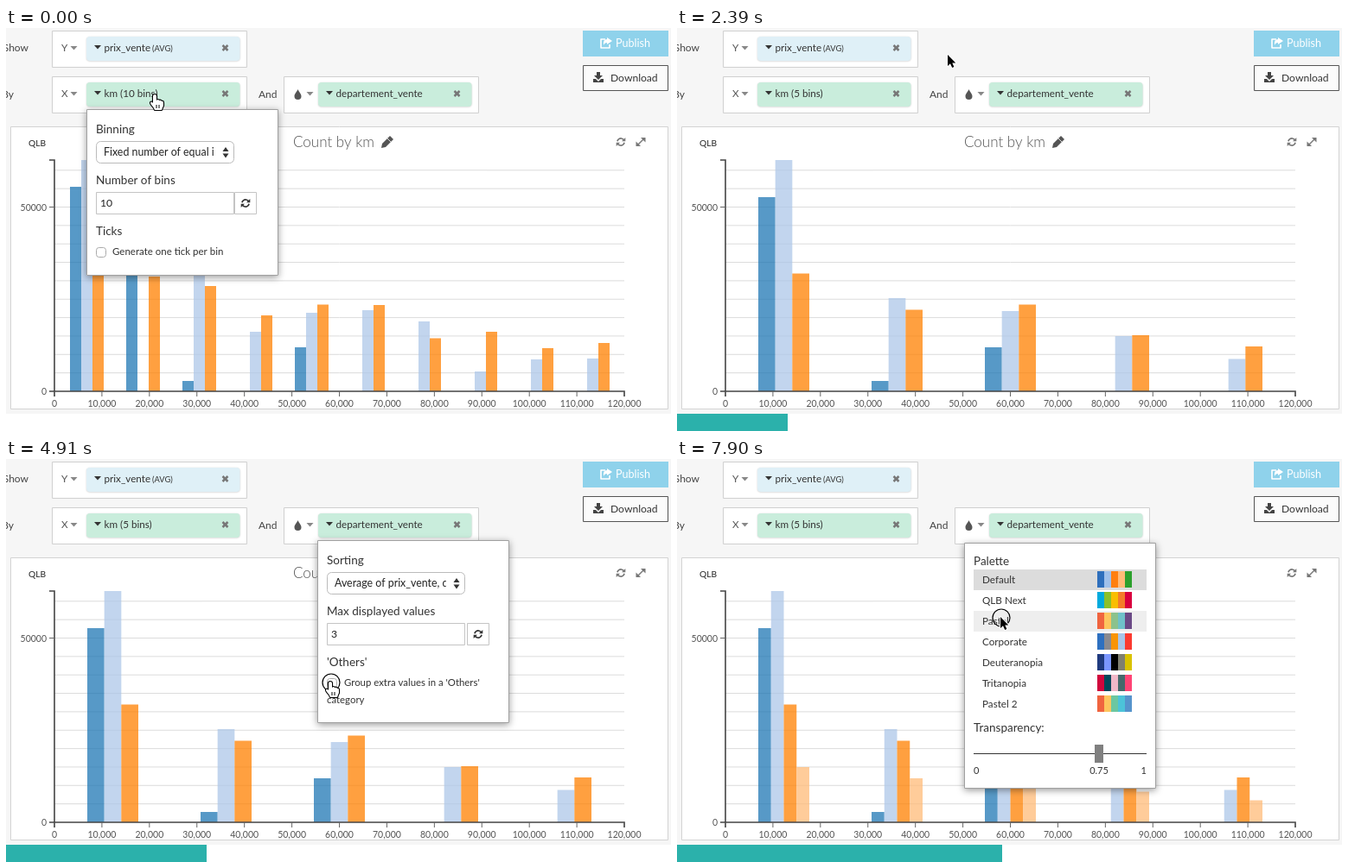
These frames come from a looping animation (769 by 467 pixels, 8 s). An HTML page with a canvas:

```html
<!DOCTYPE html>
<html lang="en">
<head>
<meta charset="utf-8">
<title>Chart options</title>
<style>
html, body { margin: 0; width: 100%; height: 100%; overflow: hidden; background: #fff; }
canvas { display: block; }
</style>
</head>
<body>
<canvas id="stage" width="769" height="467"></canvas>
<script>
const c = document.getElementById('stage').getContext('2d');
const LOOP = 8000;

// Screen updates come in bursts: first time, last time, count.
const bursts = [[150, 1050, 7], [1200, 2240, 8], [2390, 2540, 2], [3130, 3870, 6], [4170, 5210, 8],
  [5360, 6400, 8], [6550, 6700, 2], [7000, 7600, 5], [7900, 7900, 1]];
const ticks = bursts.flatMap(([a, b, n]) =>
  Array.from({ length: n }, (_, i) => a + (b - a) * i / Math.max(1, n - 1)));

// Pointer path: step, x, y, shape until the next key.
const path = [[0, 172, 77, 'hand'], [2, 162, 140, 'arrow'], [4, 140, 200, 'beam'], [6, 107, 202, 'beam'],
  [8, 108, 202, 'beam'], [10, 165, 162, 'hand'], [11, 176, 153, 'hand'], [12, 208, 112, 'arrow'],
  [15, 313, 25, 'arrow'], [17, 313, 37, 'arrow'], [20, 420, 75, 'hand'], [23, 424, 75, 'hand'],
  [24, 420, 100, 'arrow'], [28, 375, 258, 'hand'], [31, 375, 258, 'hand'], [32, 370, 235, 'arrow'],
  [36, 322, 92, 'arrow'], [38, 340, 79, 'hand'], [42, 346, 98, 'arrow'], [46, 374, 183, 'arrow'], [48, 374, 183, 'arrow']];
const clicks = [5, 21, 29, 39, 47];

// Bar tops in pixels per series; 421 is an empty bar.
const tenBins = [
  [184, 284, 409, 421, 370, 421, 421, 421, 421, 421],
  [153, 421, 270, 352, 330, 327, 340, 398, 384, 383],
  [272, 288, 299, 333, 320.5, 321, 359.5, 352, 371, 365]];
const fiveBins = [
  [196, 409, 370, 421, 421],
  [153, 313, 328, 357, 383.5],
  [284.5, 326.5, 320.5, 356, 369],
  [357, 370, 376.5, 385.5, 395.5]];
const seriesColors = ['#1f77b4', '#aec7e8', '#ff8000', '#ffbb78'];

const palettes = [
  ['Default', '#2e6fbc #9fc0ea #ff7f0e #ffbb78 #2ca02c'],
  ['QLB Next', '#00aadd #8bc02b #f9be00 #f47c2a #d9003f'],
  ['Pastel', '#f0643f #fdc55e #8cc28c #6fc1c9 #6b4a86'],
  ['Corporate', '#2e70c0 #8a8a90 #f89406 #a8c4e8 #fb3a30'],
  ['Deuteranopia', '#1f3a7f #7a96ff #000000 #7f7f70 #d9c200'],
  ['Tritanopia', '#d0063c #00485a #f0b8c8 #46696b #ff4475'],
  ['Pastel 2', '#f0643f #fdc55e #6cc7a0 #4cc3d9 #5694cc']];

function rect(x, y, w, h, fill) {
  c.fillStyle = fill;
  c.fillRect(x, y, w, h);
}

function box(x, y, w, h, fill, stroke, radius = 0) {
  c.beginPath();
  c.roundRect(x, y, w, h, radius);
  c.fillStyle = fill;
  c.fill();
  if (!stroke) return;
  c.strokeStyle = stroke;
  c.lineWidth = 1;
  c.stroke();
}

function text(s, x, y, size = 11.7, color = '#333', align = 'left', weight = 400) {
  c.font = `${weight} ${size}px Lato, sans-serif`;
  c.fillStyle = color;
  c.textAlign = align;
  c.fillText(s, x, y);
}

function line(points, color, width = 1) {
  c.beginPath();
  points.forEach(([x, y]) => c.lineTo(x, y));
  c.strokeStyle = color;
  c.lineWidth = width;
  c.stroke();
}

function poly(points, fill) {
  c.beginPath();
  points.forEach(([x, y]) => c.lineTo(x, y));
  c.closePath();
  c.fillStyle = fill;
  c.fill();
}

const triangle = (x, y, w, h, fill) => poly([[x - w, y], [x + w, y], [x, y + h]], fill);

function shape(d, x, y, fill, stroke, width = 1) {
  const p = new Path2D(d);
  c.save();
  c.translate(x, y);
  c.lineJoin = 'round';
  if (stroke) { c.strokeStyle = stroke; c.lineWidth = width; c.stroke(p); }
  if (fill) { c.fillStyle = fill; c.fill(p); }
  c.restore();
}

function refreshIcon(x, y, color) {
  for (const side of [1, -1]) {
    c.save();
    c.translate(x, y);
    c.scale(side, side);
    c.beginPath();
    c.arc(0, 0, 4.1, Math.PI * 1.06, Math.PI * 1.8);
    c.strokeStyle = color;
    c.lineWidth = 1.7;
    c.stroke();
    poly([[5.3, -5], [5.3, -0.8], [1, -0.8]], color);
    c.restore();
  }
}

function closeIcon(x, y) {
  line([[x - 3, y - 3], [x + 3, y + 3]], '#777', 2.5);
  line([[x + 3, y - 3], [x - 3, y + 3]], '#777', 2.5);
}

function shadowed(blur, alpha, draw) {
  c.save();
  c.shadowColor = `rgba(0,0,0,${alpha})`;
  c.shadowBlur = blur;
  c.shadowOffsetY = blur / 5;
  draw();
  c.restore();
}

function field(x, y, label, fill, arrowX) {
  box(x + .5, y + .5, 225, 42, '#fff', '#d0d0d0');
  shadowed(2, .2, () => box(x + 40, y + 7, 177.5, 28, fill, null, 4));
  triangle(arrowX, y + 18, 4, 4.5, '#888');
  triangle(x + 53, y + 17, 4, 4.5, '#333');
  text(label, x + 60.5, y + 24);
  closeIcon(x + 200.5, y + 20);
}

function header(step) {
  text('Show', 26, 27, 12, '#444', 'right');
  text('By', 9, 81, 12, '#444', 'right');
  text('And', 292, 81, 12, '#444');
  field(53, 3, 'prix_vente', '#dff0f7', 78.5);
  text('(AVG)', 169, 27, 9.3);
  field(53, 56, step < 15 ? 'km (10 bins)' : 'km (5 bins)', '#c9eddc', 78.5);
  field(321, 56, 'departement_vente', '#c9eddc', 351.5);
  text('Y', 64, 27, 11.7, '#555');
  text('X', 64, 80, 11.7, '#555');
  shape('M0-6C1-3 4-1 4 2A4 4 0 0 1-4 2C-4-1-1-3 0-6Z', 337.5, 77, '#555');

  rect(667, 3, 99, 30, '#8fd2eb');
  shape('M5-4H0V6H10V2', 688, 17, null, '#fff', 1.6);
  shape('M7-6L13-2L7 2V0Q4 0 3 3Q2-4 7-4Z', 688, 17, '#fff');
  text('Publish', 705, 22, 12.6, '#fff');
  box(667.5, 43.5, 98, 29, '#fbfbfb', '#555');
  shape('M-2-7H2V-3H5L0 2L-5-3H-2ZM-6 1H-3L0 4L3 1H6V5H-6Z', 685, 58, '#444');
  text('Download', 699, 62, 12.1, '#333');
}

function bars(tops, left, pitch, width) {
  c.globalAlpha = .75;
  tops[0].forEach((_, group) => {
    let x = left + group * pitch;
    tops.forEach((series, i) => {
      rect(x, series[group], width, 421 - series[group], seriesColors[i]);
      x += width;
    });
  });
  c.globalAlpha = 1;
}

function chart(step) {
  box(5.5, 114.5, 760, 327, '#fff', '#d3d3d3');
  text('QLB', 26, 137, 10.2, '#222');
  text('Count by km', 332, 138, 17, '#555', 'left', 300);
  shape('M-7 7L-6 2L3-7L7-3L-2 6Z', 441, 132, '#555');
  line([[441, 128], [445, 132]], '#fff', .8);
  refreshIcon(711, 132, '#777');
  line([[730.5, 135.5], [737.5, 128.5]], '#777', 1.5);
  poly([[734, 127], [739.5, 127], [739.5, 132.5]], '#777');
  poly([[728.5, 131.5], [728.5, 137], [734, 137]], '#777');

  for (let i = 1; i <= 12; i++) {
    const y = 421 - i * 21.35;
    line([[56, y], [715, y]], '#dcdcdc');
  }
  if (step < 16) {
    bars(tenBins, 74, 65, 13);
  } else {
    const p = Math.max(0, Math.min(1, (step - 30.85) / 1.5));
    const tops = fiveBins.slice(0, p ? 4 : 3);
    if (p) tops[3] = tops[3].map(y => 421 - (421 - y) * p);
    bars(tops, 94, 131, 59 / (3 + p));
  }
  line([[50, 153], [56, 153], [56, 421], [50, 421]], '#444', 1.6);
  line([[50, 207.5], [56, 207.5]], '#666');
  line([[56, 427], [56, 421], [715, 421], [715, 427]], '#444', 1.6);
  text('50000', 47, 212, 10.5, '#555', 'right');
  text('0', 47, 425, 10.5, '#555', 'right');
  for (let i = 0; i <= 12; i++) {
    const x = 56 + i * 54.92;
    line([[x, 421], [x, 427]], '#666');
    text((i * 10000).toLocaleString('en-US'), x, 439, 10.5, '#555', 'center');
  }
}

function popup(x, y, w, h) {
  shadowed(8, .4, () => box(x, y, w, h, '#fff'));
  box(x + .5, y + .5, w - 1, h - 1, '#fff', '#a0a0a0');
}

function select(x, label) {
  box(x + .5, 131.5, 159, 25, '#fff', '#bbb', 5);
  c.save();
  c.beginPath();
  c.rect(x, 131, 138, 26);
  c.clip();
  text(label, x + 9, 148, 12.4, '#222');
  c.restore();
  triangle(x + 150, 143, 3.5, -5, '#333');
  triangle(x + 150, 145.5, 3.5, 5, '#333');
}

function checkbox(x, checked) {
  box(x + .5, 254.5, 11, 11, checked ? '#2f86f6' : '#fff', checked ? '#2f86f6' : '#aaa', 3);
  if (checked) line([[x + 3, 260], [x + 5.2, 262.8], [x + 9, 257]], '#fff', 1.7);
}

function optionPopup(x, h, labels, choice, value, buttonX) {
  popup(x - 11, 94, 222, h);
  labels.forEach((label, i) => text(label, x, 122 + i * 59, 13.5));
  select(x, choice);
  box(x + .5, 190.5, 159, 25, '#fff', '#c4c4c4');
  box(buttonX + .5, 190.5, 25, 25, '#fff', '#c4c4c4');
  refreshIcon(buttonX + 13, 203, '#333');
  text(value, x + 5, 207, 12.2, '#222');
}

function binningPopup(step) {
  const typed = step >= 9, focused = step >= 5;
  optionPopup(104, 193, ['Binning', 'Number of bins', 'Ticks'], 'Fixed number of equal i', typed ? '' : '10', 264);
  if (focused) {
    box(104.5, 190.5, 159, 25, '#fff', '#4a80d8');
    if (!typed && step > 5) rect(108, 194, 15, 18, '#b3d6fd');
    text(typed ? '5' : '10', 109, 207, 12.2, '#222');
    if (typed) rect(115, 194, 1, 17, '#000');
    box(249, 196.5, 7, 13, '#fff', '#ddd', 3);
    triangle(252.5, 201.5, 2, -2.5, '#777');
    triangle(252.5, 204.5, 2, 2.5, '#777');
  }
  checkbox(104, false);
  text('Generate one tick per bin', 123, 263, 11.5);
}

function sortingPopup(step) {
  optionPopup(371, 212, ['Sorting', 'Max displayed values', "'Others'"], 'Average of prix_vente, descending', '3', 533);
  checkbox(371, step >= 30);
  text("Group extra values in a 'Others'", 391, 263, 11.4);
  text('category', 371, 283, 11.4);
}

function palettePopup(pointerY) {
  popup(332, 97, 222, 285);
  text('Palette', 343, 123, 13.5);
  palettes.forEach(([name, colors], i) => {
    const y = 128 + i * 24;
    const hovered = pointerY >= y && pointerY < y + 24;
    if (i === 0 || hovered) rect(343, y, 200, 24, i ? '#eeeeee' : '#dcdcdc');
    text(name, 353, y + 16);
    colors.split(' ').forEach((color, j) => rect(486 + j * 8, y + 2, 8, 19, color));
  });
  text('Transparency:', 343, 316, 13.5);
  line([[343, 341.5], [543, 341.5]], '#333');
  rect(483, 331, 10, 21, '#808080');
  text('0', 343, 365, 11);
  text('0.75', 488, 365, 11, '#333', 'center');
  text('1', 543, 365, 11, '#333', 'right');
}

function pointerAt(step) {
  const i = path.findIndex(key => key[0] > step) - 1;
  const [s, x, y, kind] = path[i], [s2, x2, y2] = path[i + 1];
  const p = (step - s) / (s2 - s);
  return { x: x + (x2 - x) * p, y: y + (y2 - y) * p, kind };
}

function pointer({ x, y, kind }, clicking) {
  if (clicking) {
    c.beginPath();
    c.arc(x + 1, y + 1, 10, 0, Math.PI * 2);
    c.strokeStyle = '#000';
    c.lineWidth = 1.2;
    c.stroke();
  }
  if (kind === 'arrow') {
    shape('M0 0V13L3 10.2L5.2 15L7.4 14L5.3 9.4H9.3Z', x, y, '#000', '#fff', 2);
  } else if (kind === 'beam') {
    shape('M-3-8Q0-8 0-6Q0-8 3-8M0-6V6M-3 8Q0 8 0 6Q0 8 3 8', x, y, null, '#222', 1);
  } else {
    shape('M-2 2Q-2 0 0 0Q2 0 2 2V7Q4 5 5 7Q7 6 8 8Q10 7 10 10V13Q9 15 8 18H0Q-1 15-4 12Q-6 9-4 8.5Q-3 8.5-2 10Z',
      x, y, '#fff', '#000', 2.2);
    line([[x + 2, y + 12], [x + 2, y + 16]], '#000');
    line([[x + 5, y + 12], [x + 5, y + 16]], '#000');
  }
}

function draw(now) {
  const time = now % LOOP + 5;
  const step = ticks.filter(t => t <= time).length;
  const mouse = pointerAt(step);
  rect(0, 0, 769, 467, '#fff');
  rect(0, 0, 769, 447, '#f6f6f6');
  header(step);
  chart(step);
  if (step < 14) binningPopup(step);
  if (step >= 22 && step < 40) sortingPopup(step);
  if (step >= 41) palettePopup(mouse.y);
  pointer(mouse, clicks.includes(step));
  rect(0, 447, step * 8, 20, '#2bb1ab');
  requestAnimationFrame(() => draw(performance.now()));
}
draw(performance.now());
</script>
</body>
</html>
```
